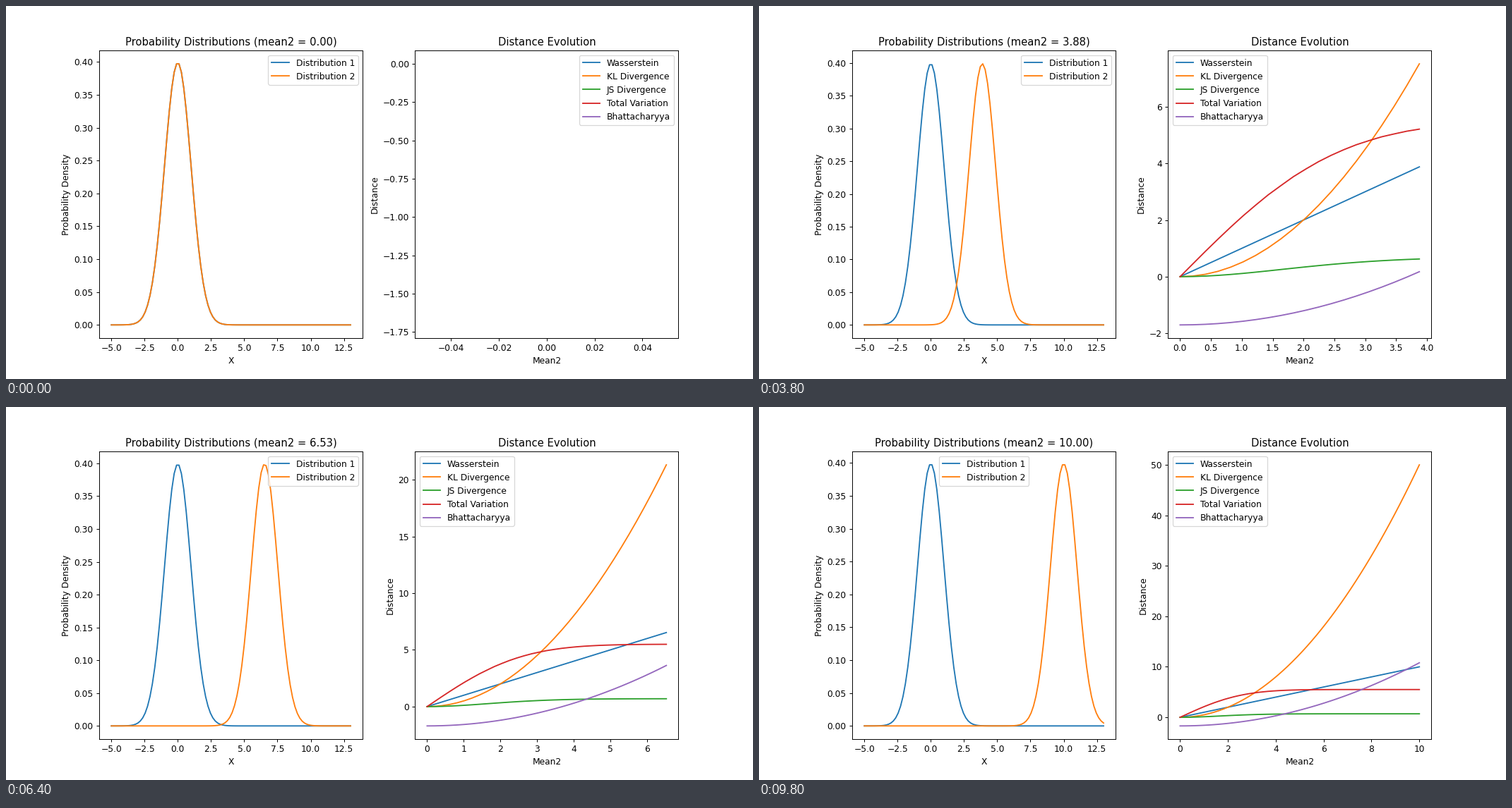
These frames come from a looping animation (1058x529 px, 10 s). A matplotlib script:

```python
import matplotlib.pyplot as plt
import numpy as np
from matplotlib.animation import FuncAnimation

FRAMES = 50
LABELS = ["Wasserstein", "KL Divergence", "JS Divergence",
          "Total Variation", "Bhattacharyya"]

x = np.linspace(-5, 13, 100)
means = np.linspace(0, 10, FRAMES)


def normal_pdf(mean):
    return np.exp(-0.5 * (x - mean) ** 2) / np.sqrt(2 * np.pi)


def kl(a, b):
    return np.sum(a * np.log(a / b))


def distances(p, q):
    """All five distances; the last two use the raw, unnormalised samples."""
    a, b = p / p.sum(), q / q.sum()
    mid = (a + b) / 2
    wasserstein = np.sum(np.abs(np.cumsum(a - b))) * (x[1] - x[0])
    js = (kl(a, mid) + kl(b, mid)) / 2
    total_variation = np.sum(np.abs(p - q)) / 2
    bhattacharyya = -np.log(np.sum(np.sqrt(p * q)))
    return wasserstein, kl(a, b), js, total_variation, bhattacharyya


base = normal_pdf(0)
history = np.array([distances(base, normal_pdf(m)) for m in means])

# 12 x 6 inches filling a stage of 1058 x 529 pixels
fig, (left, right) = plt.subplots(1, 2, figsize=(12, 6), dpi=1058 / 12)


def decorate(ax, title, xlabel, ylabel):
    ax.set_title(title)
    ax.set_xlabel(xlabel)
    ax.set_ylabel(ylabel)
    ax.legend(loc="best")


def draw(i):
    left.clear()
    left.plot(x, base, label="Distribution 1")
    left.plot(x, normal_pdf(means[i]), label="Distribution 2")
    decorate(left, f"Probability Distributions (mean2 = {means[i]:.2f})",
             "X", "Probability Density")

    right.clear()
    for values, label in zip(history.T, LABELS):
        right.plot(means[:i + 1], values[:i + 1], label=label)
    decorate(right, "Distance Evolution", "Mean2", "Distance")


def start():
    draw(0)


anim = FuncAnimation(fig, draw, frames=FRAMES, init_func=start,
                     interval=200, repeat=True, repeat_delay=0)
plt.show()
```
